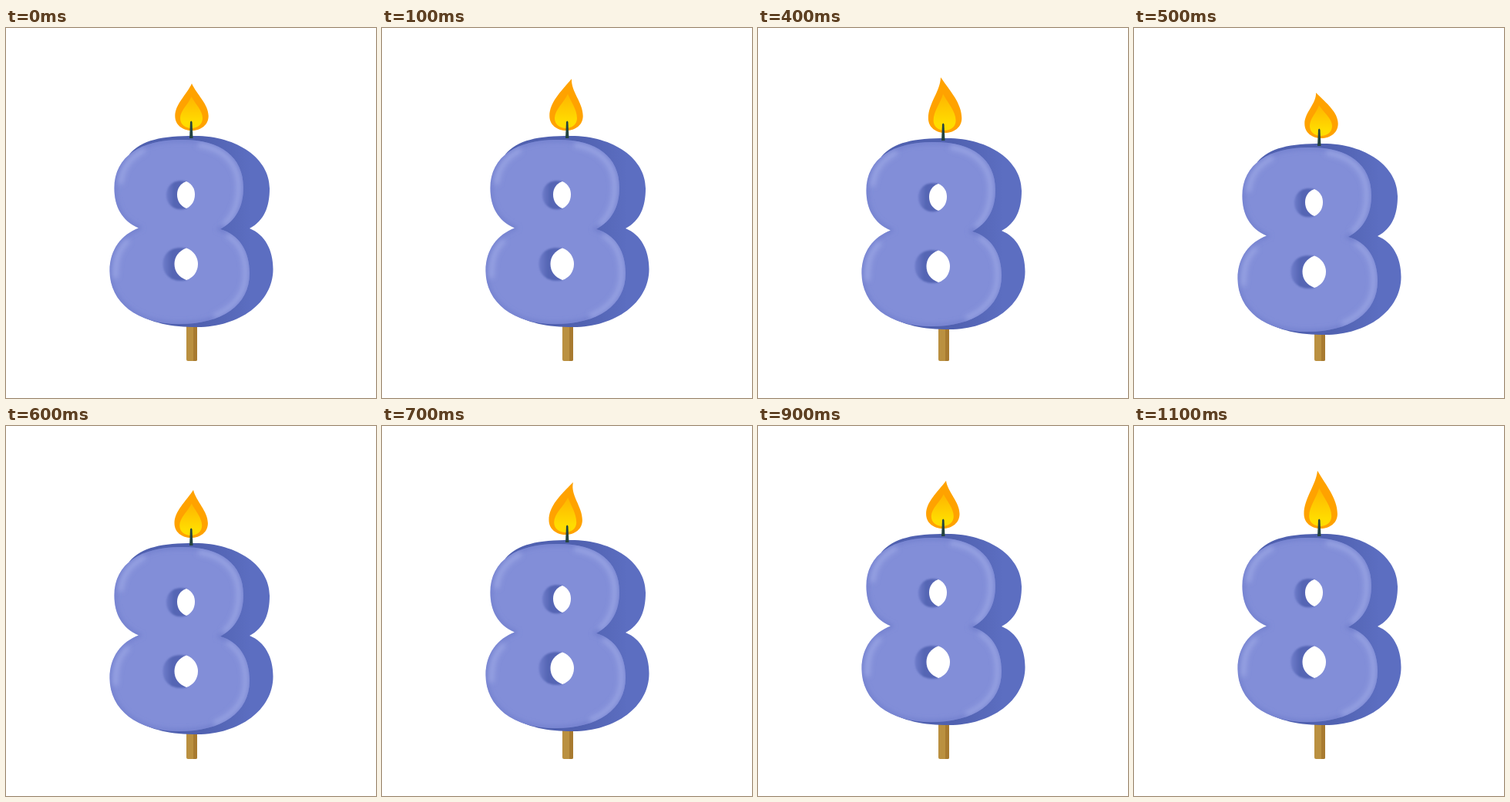
An HTML page for the animation above (1.2 s loop, 480 by 480 pixels).

```html
<!DOCTYPE html>
<html lang="en">
<head>
<meta charset="utf-8">
<title>Birthday candle</title>
<style>
  html, body { margin: 0; width: 100%; height: 100%; overflow: hidden; background: #fff; }
  svg { display: block; width: 100vw; height: 100vh; }
</style>
</head>
<body>
<svg viewBox="0 0 480 480">
  <defs>
    <path id="face" d="M172 259.500C150 250 140.500 231 140.500 208C140.500 166 176 145 226 145C277 144 308 166 308 207C308 232 298 250 278 261C303 268 316 290 316 318C316 360 280 384 225 384C170 384 134.500 356 134.500 315C134.500 287 150 268 172 259.500Z"/>
    <clipPath id="faceClip"><use href="#face"/></clipPath>
    <linearGradient id="side" x1="0" x2="1">
      <stop offset=".5" stop-color="#5061b0"/>
      <stop offset=".85" stop-color="#5c6ec1"/>
    </linearGradient>
    <linearGradient id="wall" x1="0" x2="1">
      <stop offset="0" stop-color="#6f7cca"/>
      <stop offset=".4" stop-color="#5465b4"/>
    </linearGradient>
    <linearGradient id="glow" x1="0" y1="0" x2="0" y2="1">
      <stop offset="0" stop-color="#ffb400"/>
      <stop offset=".8" stop-color="#ffdc00"/>
    </linearGradient>
    <filter id="soft" x="-20%" y="-20%" width="140%" height="140%"><feGaussianBlur stdDeviation="3"/></filter>
    <filter id="blur" x="-20%" y="-20%" width="140%" height="140%"><feGaussianBlur stdDeviation="1.2"/></filter>
  </defs>

  <path d="M234 380H248V430Q248 432 246 432H236Q234 432 234 430Z" fill="#ba9040"/>
  <path d="M243 380H248V430Q248 432 246 432H243Z" fill="#a87a30"/>

  <g id="candle">
    <path fill="url(#side)" d="M160 164C176 145 202 140 245 140C301 140 342 170 342 208C342 232 335 250 316 260C336 268 346.500 288 346.500 313C346.500 356 303 388 248 388C215 388 188 383 165 368L185 260Z"/>
    <use href="#face" fill="#828ed8"/>
    <g clip-path="url(#faceClip)" fill="none">
      <use href="#face" stroke="#6d7bcb" stroke-width="4" filter="url(#soft)"/>
      <g stroke="#9aa5e4" stroke-width="6" stroke-linecap="round" filter="url(#soft)">
        <path d="M252 152C284 157 302 178 302 207C302 228 294 245 284 254"/>
        <path d="M289 270C305 280 311 298 311 319C311 345 295 363 272 373"/>
        <path d="M149 200C151 181 161 168 178 159M142 322C142 300 146 288 157 277"/>
      </g>
    </g>
    <g fill="url(#wall)" filter="url(#blur)">
      <path d="M234 199C216 195 208 206 208 217C208 229 219 239 234 234Z"/>
      <path d="M234 286C213 282 203.500 294 203.500 306C203.500 320 215 331 234 327Z"/>
    </g>
    <g fill="#fff">
      <path d="M234 199C242 203 245 209 245 216C245 224 241 231 234 234C226 231 222 224 222 216C222 208 226 202 234 199Z"/>
      <path d="M234 285.500C244 289 249 298 249 306C249 316 243 324 234 327C224 323 218.500 316 218.500 306C218.500 297 224 289 234 285.500Z"/>
    </g>
    <path id="outer" fill="#ffa200"/>
    <path id="inner" fill="url(#glow)"/>
    <path d="M239 122Q240.300 119 241.500 122L242.500 143H238Z" fill="#24443f"/>
  </g>
</svg>
<script>
const STEP = 100;
// [flame tip x, flame tip y, candle drop] for each step of the loop
const poses = [
  [241, 72, 0], [246, 66, 0], [239, 58, 0], [246, 72, 0],
  [237, 64 - 3, 3], [236, 74, 10], [243, 71, 12], [248, 65, 8],
  [239, 74, 1], [244, 71, 0], [245, 64, 0], [238, 58, 0]
];
const el = id => document.getElementById(id);

// Teardrop with its tip at (tx, ty) and a round belly of half-width r centred on cx
function drop(tx, ty, cx, r, belly, bottom) {
  const shoulder = ty + (belly - ty) * .34, neck = r * .3;
  const bend = 241 - (tx - 241) * .5;
  const high = belly - (belly - ty) * .36, low = belly + (bottom - belly) * .62;
  const mid = r * .55;
  return `M${tx} ${ty}C${bend + neck} ${shoulder} ${cx + r} ${high} ${cx + r} ${belly}` +
    `C${cx + r} ${low} ${cx + mid} ${bottom} ${cx} ${bottom}` +
    `C${cx - mid} ${bottom} ${cx - r} ${low} ${cx - r} ${belly}` +
    `C${cx - r} ${high} ${bend - neck} ${shoulder} ${tx} ${ty}Z`;
}

function draw(now) {
  const [x, y, fall] = poses[Math.floor(now / STEP) % poses.length];
  const lean = x - 241, cx = 241 - lean * .4;
  el("candle").setAttribute("transform", `translate(0 ${fall})`);
  el("outer").setAttribute("d", drop(x, y, cx, 21.7, 114, 133));
  el("inner").setAttribute("d", drop(240.5 + lean * .1, 89 + (y - 72) * .6, cx - .5, 14.5, 117, 130));
}

const start = performance.now();
function tick() {
  draw(performance.now() - start);
  requestAnimationFrame(tick);
}
tick();
</script>
</body>
</html>
```
